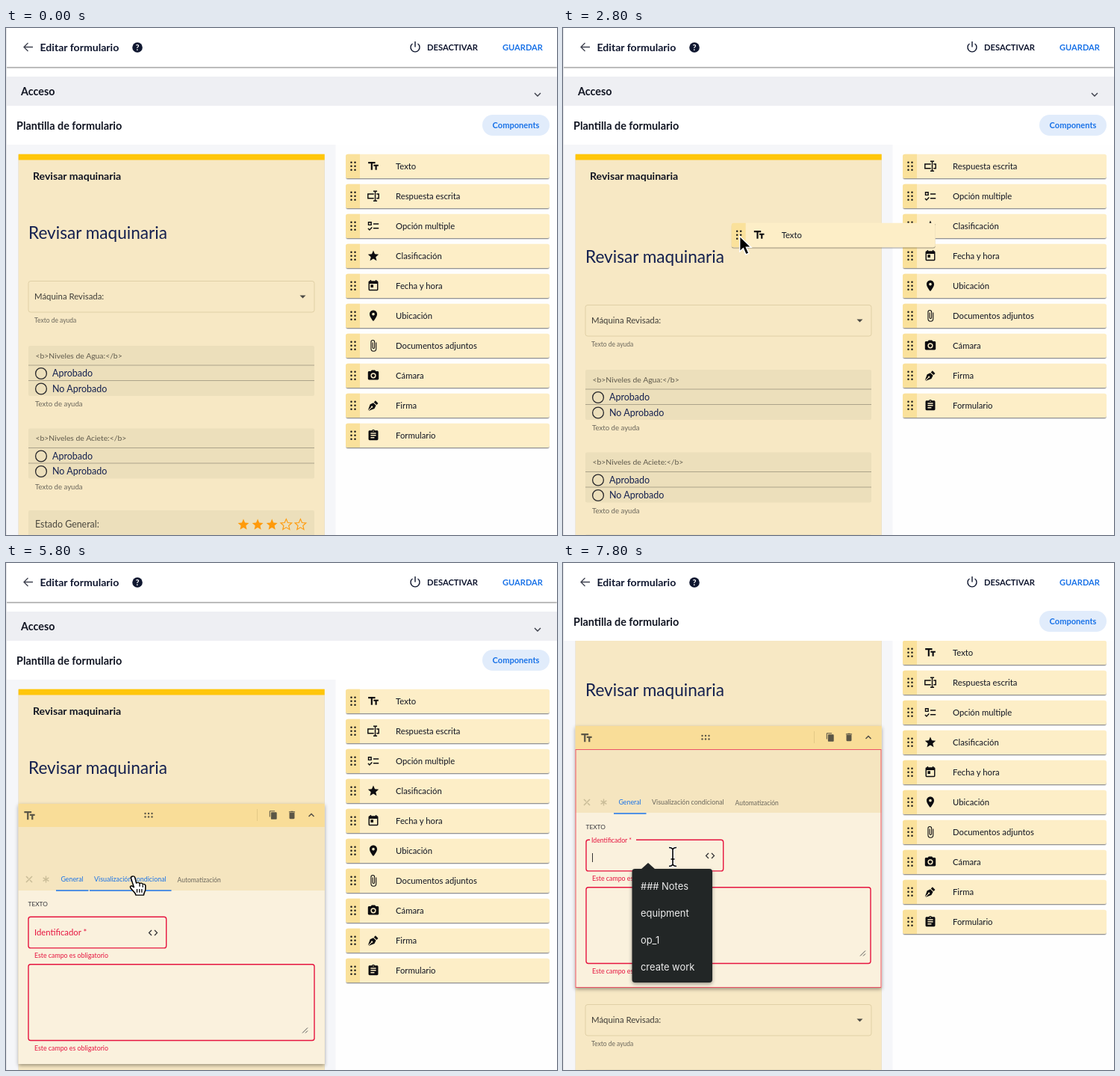
An HTML page that plays this animation: 738x678 px, repeating every 8000 ms.

```html
<!DOCTYPE html>
<html lang="es">
<head>
<meta charset="utf-8">
<title>Editar formulario</title>
<style>
html, body { margin: 0; width: 100%; height: 100%; overflow: hidden; background: #fff; }
svg { display: block; width: 100%; height: 100%; }
text { font-family: Lato, "Open Sans", sans-serif; white-space: pre; }
#popup text { font-family: Inter, Roboto, sans-serif; }
</style>
</head>
<body>
<svg id="stage" viewBox="0 0 738 678"></svg>
<script>
const INK = '#111522', NAVY = '#14204f', BLUE = '#1a73e8', RED = '#e6143f', GREY = '#6b675c';
const FORM = '#f7e8c4', PALE = '#faf1dd';

const ICONS = {
  text: 'M2.5 4v3h5v12h3V7h5V4h-13zm19 5h-9v3h3v7h3v-7h3V9z',
  answer: 'M1 7h12v2H3v6h10v2H1zM18 7h5v10h-5v-2h3V9h-3zM12 2h7v2h-2.5v16H19v2h-7v-2h2.5V4H12z',
  choice: 'M2 4h7v7H2zm2 2v3h3V6zM12 7h10v2H12zM12 15h10v2H12zM5 20.5L1.500 17l1.400-1.400L5 17.700l4-4 1.400 1.400z',
  star: 'M12 17.27L18.18 21l-1.64-7.03L22 9.24l-7.19-.61L12 2 9.19 8.63 2 9.24l5.46 4.73L5.82 21z',
  date: 'M19 3h-1V1h-2v2H8V1H6v2H5c-1.100 0-2 .9-2 2v14c0 1.100.9 2 2 2h14c1.100 0 2-.9 2-2V5c0-1.100-.9-2-2-2zm0 16H5V8h14v11zM7 10h5v5H7z',
  place: 'M12 2C8.130 2 5 5.130 5 9c0 5.250 7 13 7 13s7-7.750 7-13c0-3.870-3.130-7-7-7zm0 9.500a2.500 2.500 0 1 1 0-5 2.500 2.500 0 0 1 0 5z',
  clip: 'M16.500 6v11.500a4 4 0 0 1-8 0V5a2.500 2.500 0 0 1 5 0v10.500a1 1 0 0 1-2 0V6H10v9.500a2.500 2.500 0 0 0 5 0V5a4 4 0 0 0-8 0v12.500a5.500 5.500 0 0 0 11 0V6z',
  camera: 'M9 2L7.170 4H4c-1.100 0-2 .9-2 2v12c0 1.100.9 2 2 2h16c1.100 0 2-.9 2-2V6c0-1.100-.9-2-2-2h-3.170L15 2zm3 15a5 5 0 1 1 0-10 5 5 0 0 1 0 10zm0-8a3 3 0 1 0 0 6 3 3 0 0 0 0-6z',
  pen: 'M16 3l5 5-3 3-5-5zM12 7l5 5-3 6-11 4 6-6a1.500 1.500 0 1 0-1-1l-6 6 4-11z',
  sheet: 'M19 3h-4.200a3 3 0 0 0-5.600 0H5c-1.100 0-2 .9-2 2v14c0 1.100.9 2 2 2h14c1.100 0 2-.9 2-2V5c0-1.100-.9-2-2-2zm-7 0a1 1 0 1 1 0 2 1 1 0 0 1 0-2zm2 14H7v-2h7zm3-4H7v-2h10zm0-4H7V7h10z',
  copy: 'M16 1H4c-1.100 0-2 .9-2 2v14h2V3h12zm3 4H8c-1.100 0-2 .9-2 2v14c0 1.100.9 2 2 2h11c1.100 0 2-.9 2-2V7c0-1.100-.9-2-2-2z',
  trash: 'M6 19c0 1.100.9 2 2 2h8c1.100 0 2-.9 2-2V7H6zM19 4h-3.500l-1-1h-5l-1 1H5v2h14z'
};
const ITEMS = [
  ['text', 'Texto'], ['answer', 'Respuesta escrita'], ['choice', 'Opción multiple'],
  ['star', 'Clasificación'], ['date', 'Fecha y hora'], ['place', 'Ubicación'],
  ['clip', 'Documentos adjuntos'], ['camera', 'Cámara'], ['pen', 'Firma'], ['sheet', 'Formulario']
];

const esc = s => s.replace(/</g, '&lt;').replace(/>/g, '&gt;');
// y is the middle of the line
const text = (x, y, size, str, fill = INK, weight = 400, more = '') =>
  `<text x="${x}" y="${y + size * 0.35}" font-size="${size}" fill="${fill}" font-weight="${weight}" ${more}>${esc(str)}</text>`;
const rect = (x, y, w, h, fill, more = '') =>
  `<rect x="${x}" y="${y}" width="${w}" height="${h}" fill="${fill}" ${more}/>`;
const line = (d, stroke, width = 1, more = '') =>
  `<path d="${d}" fill="none" stroke="${stroke}" stroke-width="${width}" ${more}/>`;
const icon = (name, x, y, scale = 0.72, fill = '#0c0c10', more = '') =>
  `<path transform="translate(${x} ${y}) scale(${scale}) translate(-12 -12)" d="${ICONS[name]}" fill="${fill}" fill-rule="evenodd" ${more}/>`;
const group = (id, body, more = '') => `<g id="${id}" ${more}>${body}</g>`;

function dots(x, y, cols, rows, gap, r, fill) {
  let s = '';
  for (let i = 0; i < cols * rows; i++)
    s += `<circle cx="${x + (i % cols) * gap}" cy="${y + Math.floor(i / cols) * gap}" r="${r}" fill="${fill}"/>`;
  return s;
}

// Component card with its top left corner at 0,0
const card = ([name, label]) =>
  rect(0, 0, 273, 32.3, '#fdeec7', 'rx="3" filter="url(#low)"') +
  '<path d="M3 0H19V32.300H3Q0 32.300 0 29.300V3Q0 0 3 0Z" fill="#fae19b"/>' +
  dots(7.5, 11, 2, 3, 5, 1.25, '#1b1b1b') +
  icon(name, 37, 16, 0.72) + text(67, 16, 11.3, label);

const choiceGroup = (y, title) =>
  rect(30, y, 383, 67, '#ecdfbb', 'rx="2"') +
  text(39.5, y + 13, 10.4, title, '#5f5a4c') +
  line(`M30 ${y + 26}H413M30 ${y + 46.5}H413`, '#aca38a') +
  ['Aprobado', 'No Aprobado'].map((s, i) =>
    `<circle cx="47" cy="${y + 37 + i * 20.5}" r="7.4" fill="none" stroke="#27272b" stroke-width="1.3"/>` +
    text(62, y + 37 + i * 20.5, 12.5, s, NAVY)).join('') +
  text(39, y + 78, 9.6, 'Texto de ayuda', GREY);

const fields =
  rect(30, 338.5, 383, 41.5, 'none', 'rx="3" stroke="#e0d0a6"') +
  text(38, 359, 11.4, 'Máquina Revisada:', '#3f3d38') +
  '<path d="M393.500 357.500h8l-4 4z" fill="#4c4a45"/>' +
  text(38, 391, 8.5, 'Texto de ayuda', GREY) +
  choiceGroup(425, '<b>Niveles de Agua:</b>') +
  choiceGroup(535.5, '<b>Niveles de Aciete:</b>') +
  rect(30, 645, 383, 40, '#ecdfbb', 'rx="2"') +
  text(39, 664, 12.4, 'Estado General:', '#4a473e') +
  [0, 1, 2, 3, 4].map(i => icon('star', 318 + i * 19.1, 664, 0.74, i < 3 ? '#ff9a0a' : 'none',
    i < 3 ? '' : 'stroke="#ff9a0a" stroke-width="1.500"')).join('');

const errorText = y => text(38, y, 8.8, 'Este campo es obligatorio', RED);
const panel =
  rect(16.7, 322, 410, 348, FORM, 'id="panelBase" filter="url(#high)"') +
  rect(16.7, 322, 410, 31, '#f9dd98') +
  icon('text', 31.5, 338, 0.75, '#5b5646') +
  dots(186.5, 335, 3, 2, 4.5, 1.2, '#5b5646') +
  line('M336.500 329V345', '#e3c987') +
  icon('copy', 358, 337, 0.52, '#5b5646') + icon('trash', 383, 337, 0.58, '#5b5646') +
  line('M405.500 339l3.500-3.500 3.500 3.500', '#4c4a45', 1.4) +
  rect(16.7, 353, 410, 85, '#f5e5bf') +
  rect(16.7, 438, 410, 232, PALE, 'id="panelBody"') +
  rect(17, 353.5, 409, 318, 'none', 'id="panelEdge" stroke="#ec5266" stroke-width="1"') +
  group('panelIn',
    line('M27 427l8-8M27 419l3 3M32 424l3 3', '#cabd98', 1.6) +
    line('M53.500 418.500v9M49.600 420.800l7.800 4.500M57.400 420.800l-7.800 4.500', '#cabd98', 1.4) +
    text(73.5, 423, 8.8, 'General', BLUE) + line('M67 438H110.500', BLUE, 1.4) +
    text(118, 423, 8.9, 'Visualización condicional', GREY, 400, 'id="tab"') +
    line('M112 438H221.500', BLUE, 1.4, 'id="tabLine"') +
    text(229.5, 424, 8.5, 'Automatización', GREY) +
    text(29.5, 456, 8.3, 'TEXTO', '#34343a') +
    rect(30, 473.2, 184.7, 41.7, 'none', `id="nameBox" rx="3" stroke="${RED}" stroke-width="1.400"`) +
    text(38, 494, 11.3, 'Identificador *', RED, 400, 'id="nameLabel"') +
    group('nameFocus', rect(35, 470, 62, 7, PALE) + text(37, 474, 8.7, 'Identificador *', RED) +
      line('M38.500 491V503', '#333')) +
    line('M195 491l-3.500 3.500 3.500 3.500M199 491l3.500 3.500-3.500 3.500', '#2b2b2f', 1.2, 'id="code"') +
    errorText(525) +
    rect(30, 536.8, 383, 101.7, 'none', `id="area" rx="3" stroke="${RED}" stroke-width="1.400"`) +
    line('M397 628.500l7-7M401 628.500l3-3', '#555', 1) +
    errorText(649));

const form =
  rect(16.7, 168.7, 410, 1100, FORM, 'filter="url(#low)"') +
  rect(16.7, 168.7, 410, 7.8, '#ffc60a') +
  text(36, 198, 14.1, 'Revisar maquinaria', INK, 700) +
  group('heading', text(30, 274, 22.6, 'Revisar maquinaria', NAVY)) +
  group('fields', fields) + group('panel', panel);

const header =
  rect(0, -6, 738, 58, '#fff', 'filter="url(#bar)"') +
  line('M36 25.500H24.500M29.500 20l-5.500 5.500 5.500 5.500', '#3f4250', 1.3) +
  text(45.5, 26, 14.1, 'Editar formulario', '#10172f', 700) +
  '<circle cx="176" cy="26" r="6.800" fill="#0f1730"/>' +
  text(176, 26.2, 11, '?', '#fff', 700, 'text-anchor="middle"') +
  line('M544.500 21a6 6 0 1 0 7 0M548 18v7.500', '#10172f', 1.4) +
  text(564, 26, 11.2, 'DESACTIVAR', '#10172f', 700) +
  text(665, 26, 11.1, 'GUARDAR', BLUE, 700);

const access =
  rect(0, 53, 738, 60, '#fff') + rect(0, 65, 738, 39, '#eeeff3') +
  text(20, 85, 14.3, 'Acceso', INK, 700) +
  line('M708 87l4 4 4-4', '#3a3d48', 1.4);

const strip =
  rect(0, 104, 738, 52, '#fff') +
  text(14, 131, 14.4, 'Plantilla de formulario', INK, 700) +
  rect(638, 116, 90, 28, '#e1ecfb', 'rx="14"') +
  text(683, 130, 11.1, 'Components', BLUE, 700, 'text-anchor="middle"');

const popup =
  '<path d="M104 410l10-9 10 9z" fill="#222526"/>' +
  rect(92.5, 409, 107.5, 152, '#222526', 'rx="4" filter="url(#high)"') +
  ['### Notes', 'equipment', 'op_1', 'create work'].map((s, i) =>
    text(104, 432 + i * 36, 12.9, s, '#ececec')).join('');

// Pointers have their hot spot at 0,0
const pointers =
  group('arrow', '<path transform="scale(1.180)" d="M0 0V17.500l4-3.700 3 7 3.400-1.500-3-6.700h5.600z" fill="#000" stroke="#fff" stroke-width="1.200"/>') +
  group('hand', '<g transform="scale(1.3 1.14) translate(-7 -1)" stroke="#000" stroke-width="1.200" stroke-linejoin="round">' +
    '<path d="M5 1c1.300-.3 2.300.4 2.600 1.600L9 9c.5-.9 3.100-.9 3.400.6.6-1 3-.7 3.200.8.8-.7 2.800-.3 2.800 1.600v4c0 3-1.800 4-1.800 7H8.500c-.4-3-3.500-5-5.500-8.500-1-1.700.8-3 2.200-1.700l1.300 1L3.500 3.300C3.200 2.200 3.900 1.300 5 1z" fill="#fff"/>' +
    '<path d="M12.400 10v3M15.600 11v3M9.700 16v4M12.200 16v4M14.600 16v4" fill="none" stroke-width="1"/></g>') +
  group('beam', ['#fff', '#000'].map((c, i) =>
    line('M-5-12.500q4 0 5 2.500q1-2.500 5-2.500M-5 12.500q4 0 5-2.500q1 2.500 5 2.500M0-10V10M-2.500 3h5', c, 3.6 - 2 * i)).join(''));

const shadow = (id, dy, blur, alpha) =>
  `<filter id="${id}" x="-5%" y="-20%" width="110%" height="150%"><feDropShadow dx="0" dy="${dy}" stdDeviation="${blur}" flood-color="#000" flood-opacity="${alpha}"/></filter>`;

document.getElementById('stage').innerHTML =
  `<defs>${shadow('low', 1.3, 0.7, 0.42)}${shadow('high', 2, 2.4, 0.38)}${shadow('bar', 1, 1.1, 0.5)}</defs>` +
  rect(0, 0, 738, 678, '#fefefe') + rect(0, 104, 441.5, 574, '#f5f6f9') +
  group('form', form) +
  group('list', ITEMS.map((item, i) => group('item' + i, card(item))).join('')) +
  group('access', access) + header + group('strip', strip) +
  rect(0, 0, 1, 678, '#e2e3e6') +
  group('drag', card(ITEMS[0])) + group('popup', popup) + pointers;

const el = {};
document.querySelectorAll('#stage [id]').forEach(n => el[n.id] = n);
const move = (id, x, y) => el[id].setAttribute('transform', `translate(${x} ${y})`);
const show = (id, on) => el[id].setAttribute('display', on ? 'inline' : 'none');
const set = (id, name, value) => el[id].setAttribute(name, value);

// Linear track of [time, ...values]
function track(keys, t) {
  let i = 0;
  while (i < keys.length - 2 && t >= keys[i + 1][0]) i++;
  const a = keys[i], b = keys[i + 1];
  const k = Math.min(1, Math.max(0, (t - a[0]) / (b[0] - a[0])));
  return a.slice(1).map((v, j) => v + (b[j + 1] - v) * k);
}

const POINTER = [
  [200, 510, 250], [400, 466, 186.5], [800, 405, 207], [1200, 372, 226], [2200, 341, 239],
  [2600, 300, 255], [3200, 110, 325], [3600, 67, 339.5], [4400, 67, 339.5],
  [5200, 150, 410], [5600, 172, 419], [6300, 172, 419], [6600, 166, 419],
  [6900, 166, 419], [7400, 147, 393], [8000, 147, 393]
];
const SCROLL = [[5800, 0], [6000, 22], [6200, 58], [6400, 86], [6600, 99], [6800, 104]];
const DROP = 4200;

function draw(t) {
  const [x, y] = track(POINTER, t), [scroll] = track(SCROLL, t);
  const dragging = t >= 400 && t < DROP, over = t >= 800 && t < DROP;
  const open = t >= DROP, focus = t >= 7400, hover = t >= 5400 && t < 6400;

  move('form', 0, -scroll);
  move('heading', 0, over ? (t < 3000 ? 32 : -6) : 0);
  move('fields', 0, open ? (focus ? 356 : 354) : over ? 32 : 0);

  show('panel', open);
  show('panelEdge', focus);
  show('nameFocus', focus);
  show('nameLabel', !focus);
  show('tabLine', hover);
  set('tab', 'fill', hover ? BLUE : GREY);
  const d = focus ? 1 : 0;
  move('panelIn', d, d);
  move('code', -d, 0);
  set('nameBox', 'width', 184.7 - d);
  set('area', 'width', 383 - 2 * d);
  set('panelBase', 'height', 348 + 2 * d);
  set('panelBody', 'height', 232 + 2 * d);

  move('list', 0, -Math.min(scroll, 65));
  ITEMS.forEach((_, i) => move('item' + i, 455, 168.8 + 40 * i - (over ? 40 : 0)));
  show('item0', !dragging);
  move('access', 0, -scroll);
  move('strip', 0, -Math.min(scroll, 52));

  show('drag', dragging);
  move('drag', x - 11, y - 17.5);
  show('popup', t >= 7600);

  const shape = t < 200 ? '' : t < 5200 ? 'arrow' : t < 6600 ? 'hand' : 'beam';
  ['arrow', 'hand', 'beam'].forEach(id => { show(id, id === shape); move(id, x, y); });
}

const start = performance.now();
function tick() {
  const t = (performance.now() - start) % 8000;
  draw(Math.floor(t / 200) * 200);
  requestAnimationFrame(tick);
}
tick();
</script>
</body>
</html>
```
